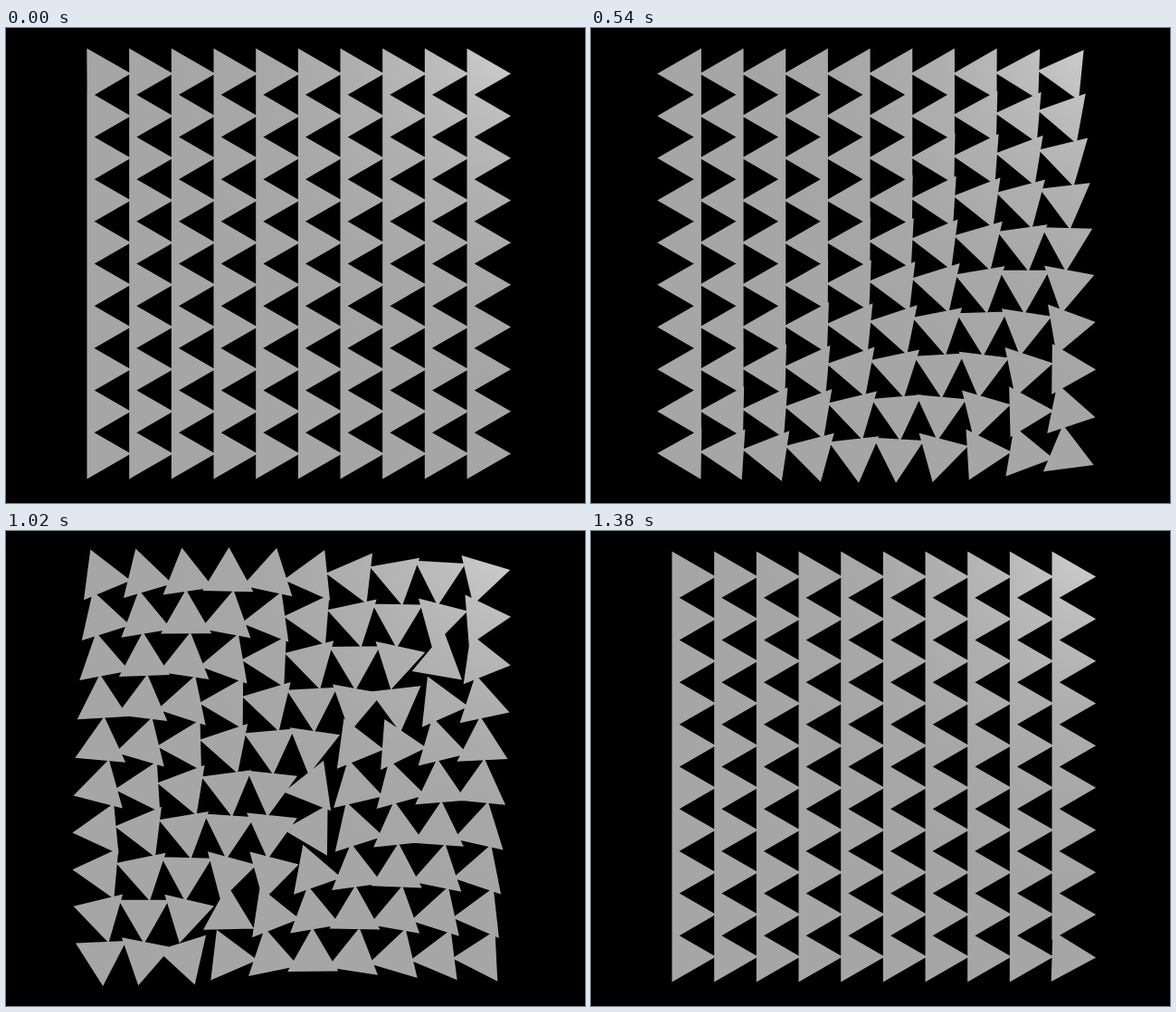
These frames come from a looping animation (640x525 px, 1.41 s). An HTML page with a canvas:

```html
<!DOCTYPE html>
<html>
<head>
<meta charset="utf-8">
<style>
  html, body { margin: 0; width: 100%; height: 100%; overflow: hidden; background: #000; }
  canvas { display: block; }
</style>
</head>
<body>
<canvas id="stage" width="640" height="525"></canvas>
<script>
const ctx = document.getElementById('stage').getContext('2d');
const LOOP = 1410, STEP = 30;
const COUNT = 10, PITCH = 46.67, RADIUS = 32.4, LEFT = 105.7, TOP = 50.5;
const TURN = 420, SECOND_TURN = 667;
const SPIN_START = 160, SPIN_END = 185;

// A soft light in the upper right corner
const light = ctx.createRadialGradient(575, 5, 0, 575, 5, 380);
[[0, 208], [0.13, 200], [0.28, 187], [0.5, 175], [0.75, 168], [1, 166]]
  .forEach(([stop, v]) => light.addColorStop(stop, `rgb(${v},${v},${v})`));

const halfTurn = time => {
  const p = Math.min(1, Math.max(0, time / TURN));
  return 90 * (1 - Math.cos(Math.PI * p));
};

// The second half turn has a brief whirl backwards
function secondHalfTurn(time) {
  if (time <= SPIN_START || time >= SPIN_END) return halfTurn(time);
  const from = halfTurn(SPIN_START), to = halfTurn(SPIN_END) - 360;
  return from + (to - from) * (time - SPIN_START) / (SPIN_END - SPIN_START);
}

function addTriangle(x, y, degrees) {
  for (let i = 0; i < 3; i++) {
    const a = (i * 120 - degrees) * Math.PI / 180;
    const px = x + RADIUS * Math.cos(a), py = y + RADIUS * Math.sin(a);
    if (i) ctx.lineTo(px, py); else ctx.moveTo(px, py);
  }
  ctx.closePath();
}

function draw(now) {
  const time = Math.floor(now % LOOP / STEP) * STEP;
  ctx.fillStyle = '#000';
  ctx.fillRect(0, 0, 640, 525);
  ctx.beginPath();
  for (let row = 0; row < COUNT; row++) {
    for (let col = 0; col < COUNT; col++) {
      const local = time - (20 * col + 16.8 * row - 12);
      const angle = halfTurn(local) + secondHalfTurn(local - SECOND_TURN);
      addTriangle(LEFT + col * PITCH, TOP + row * PITCH, angle);
    }
  }
  ctx.fillStyle = light;
  ctx.fill();
}

const start = performance.now();
function tick() {
  draw(performance.now() - start);
  requestAnimationFrame(tick);
}
tick();
</script>
</body>
</html>
```
